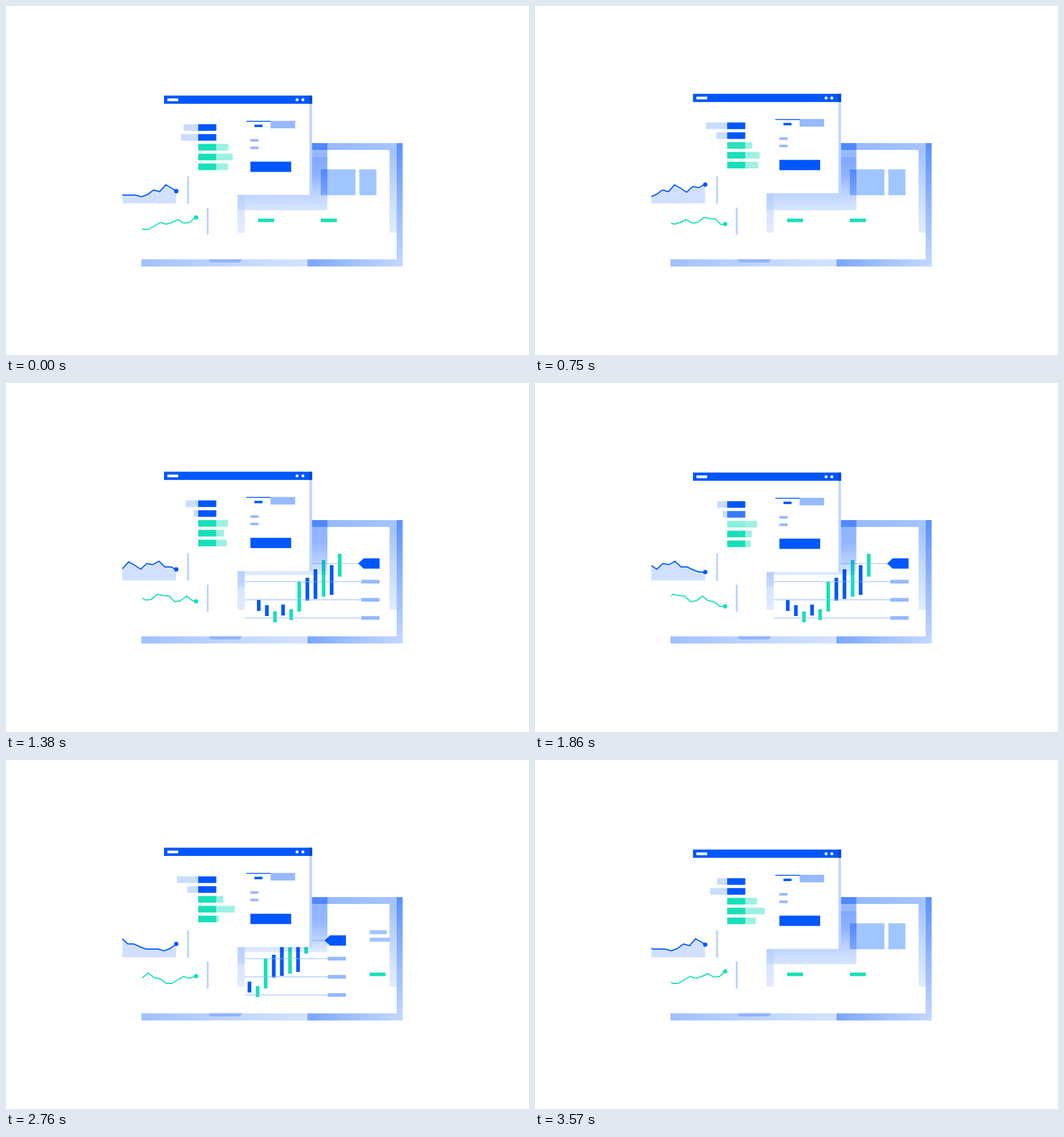
These frames come from a looping animation (917x611 px, 3600 ms). An HTML page with a canvas:

```html
<!DOCTYPE html>
<html lang="en">
<head>
<meta charset="utf-8">
<title>Trading dashboard</title>
<style>
  html, body { margin: 0; width: 100%; height: 100%; overflow: hidden; background: #fff; }
  canvas { display: block; }
</style>
</head>
<body>
<canvas id="stage" width="917" height="611"></canvas>
<script>
const ctx = document.getElementById('stage').getContext('2d');
const LOOP = 3600, STEP = 30, TURN = 2 * Math.PI;
const BLUE = '#0057ff', GREEN = '#17e0b9', PALE = '#96b9ff', SKY = '#a1c6ff';
const SCREEN = { left: 418.5, right: 673, top: 252, bottom: 443.5 };
const PANEL = SCREEN.right - SCREEN.left;

// All boxes are given by their edges.
function box(x0, y0, x1, y1, fill) {
  ctx.fillStyle = fill;
  ctx.fillRect(x0, y0, x1 - x0, y1 - y0);
}

function dot(x, y, r, fill) {
  ctx.fillStyle = fill;
  ctx.beginPath();
  ctx.arc(x, y, r, 0, TURN);
  ctx.fill();
}

function gradient(x0, y0, x1, y1, ...colors) {
  const g = ctx.createLinearGradient(x0, y0, x1, y1);
  colors.forEach((c, i) => g.addColorStop(i / (colors.length - 1), c));
  return g;
}

function clipped(x0, y0, x1, y1, draw) {
  ctx.save();
  ctx.beginPath();
  ctx.rect(x0, y0, x1 - x0, y1 - y0);
  ctx.clip();
  draw();
  ctx.restore();
}

const easeInOut = p => p < 0.5 ? 4 * p ** 3 : 1 - 4 * (1 - p) ** 3;
const ramp = (t, start, length) => easeInOut(Math.min(1, Math.max(0, (t - start) / length)));

// ---- Laptop ----

function laptopFrame() {
  box(537, 240, 685, 252, gradient(563, 0, 685, 0, '#96b9ff', '#a6c5ff'));
  box(536, 240, 563.5, 252, '#5088ff');
  box(685, 240, 695.5, 456, gradient(0, 240, 0, 456, '#5a91ff', '#92b7ff', '#c2d8ff'));
  box(672.5, 252, 685, 397, gradient(0, 252, 0, 397, '#a2c1ff', '#c6daff', '#e2ecff'));
  box(406, 320, 418.5, 397, gradient(0, 320, 0, 397, '#ccddff', '#e2ecff'));
  box(406, 320, 418.5, 357.5, gradient(0, 320, 0, 357, '#b0cbff', '#c6daff'));
  box(237.5, 443.5, 528.5, 456, gradient(237, 0, 528, 0, '#9fbfff', '#bfd5ff', '#d3e3ff'));
  box(528.5, 443.5, 695.5, 456, gradient(528, 0, 695, 0, '#7aa5ff', '#a2c1ff', '#c2d8ff'));
  ctx.fillStyle = '#90b5ff';
  ctx.beginPath();
  ctx.roundRect(356, 443.5, 57, 5.5, [0, 0, 5, 5]);
  ctx.fill();
}

function shadow(top, bottom, ...colors) {
  ctx.globalCompositeOperation = 'multiply';
  box(SCREEN.left, top, 563.5, bottom, gradient(0, top, 0, bottom, ...colors));
  ctx.globalCompositeOperation = 'source-over';
}

function panel(offset, content, drawShadow) {
  const left = Math.max(SCREEN.left, SCREEN.left + offset);
  const right = Math.min(SCREEN.right, SCREEN.right + offset);
  if (right <= left) return;
  clipped(left, SCREEN.top, right, SCREEN.bottom, () => {
    ctx.save();
    ctx.translate(offset, 0);
    content();
    ctx.restore();
    drawShadow();
  });
}

function summary() {
  box(442, 298, 472, 305, SKY);
  box(442, 311, 500, 318, SKY);
  box(552, 286, 612.7, 331.3, SKY);
  box(619.5, 286, 649.5, 331.3, SKY);
  for (const x of [442, 552]) box(x, 372.2, x + 28, 378.4, GREEN);
}

function summaryShadow() {
  shadow(252, 265, '#98baff', '#94b7ff');
  shadow(265, 357.5, '#80a8ff', '#8fb3ff', '#bcd3ff', '#d7e5ff');
}

function candleChart() {
  const tops = [380, 389, 400, 388, 396, 348, 341, 326, 310, 319, 299];
  tops.forEach((top, i) => {
    const x = 440 + i * 14.2;
    const height = i < 5 ? 19 : 52 + 12 * Math.cos(i * TURN / 4);
    const rising = i % 3 === 2 || i % 6 === 4;
    box(x, top, x + 6.4, top + height, rising ? GREEN : BLUE);
  });
  for (let i = 0; i < 4; i++) {
    const y = 316 + i * 31.8;
    box(SCREEN.left, y - 0.5, 623, y + 0.5, '#8fb6f5');
    if (i) box(623, y - 3.3, 655, y + 3.2, PALE);
  }
  ctx.fillStyle = BLUE;
  ctx.beginPath();
  for (const [x, y] of [[617.5, 316], [627, 307], [655, 307], [655, 325], [627, 325]]) ctx.lineTo(x, y);
  ctx.fill();
}

const chartShadow = () => shadow(252, 336.5, '#90b4ff', '#93b6ff', '#b4ceff', '#e2ecff');

function laptopScreen(t) {
  const slide = ramp(t, 772, 486) + ramp(t, 2572, 486);
  panel(-slide * PANEL, summary, summaryShadow);
  panel((1 - slide) * PANEL, candleChart, chartShadow);
  panel((2 - slide) * PANEL, summary, summaryShadow);
}

// ---- Browser window ----

// A row's volume follows a wave, read afresh every BEAT ms from `first` on.
const BEAT = 600;
const orders = [
  { first: 395, waves: 2, peak: 450, mean: 25.5, swing: 12 },
  { first: 575, waves: 1, peak: 3275, mean: 19, swing: 13 },
  { first: 35, waves: 2, peak: 1535, mean: 18, swing: 5.5 },
  { first: 200, waves: 1, peak: 3000, mean: 23, swing: 12 },
  { first: 395, waves: 1, peak: 395, mean: 14, swing: 9 }
];

function orderBook(t) {
  orders.forEach(({ first, waves, peak, mean, swing }, i) => {
    const y = 207 + i * 17.2, sell = i < 2;
    const beat = Math.max(0, first + BEAT * Math.floor((t - first) / BEAT));
    const width = mean + swing * Math.cos(waves * TURN * (beat - peak) / LOOP);
    if (sell) box(337 - width, y, 337, y + 11.6, '#cadcff');
    else box(368.5, y, 368.5 + width, y + 11.6, '#9df1e2');
    // A fresh value starts dimmed and comes back quickly.
    ctx.globalAlpha = beat ? Math.min(1, 0.4 + (t - beat) / 220) : 1;
    box(337, y, 368.7, y + 11.6, sell ? BLUE : GREEN);
    ctx.globalAlpha = 1;
  });
}

function browser(t) {
  ctx.save();
  ctx.translate(0, 1.65 * (Math.cos(t / 1800 * TURN) - 1));
  box(277, 157, 532, 330.8, '#fff');
  box(532, 171, 536.6, 330.8, '#bfd7ff');
  box(277, 156.8, 536.6, 171.2, BLUE);
  box(531.6, 156.8, 536.6, 171.2, '#0747cf');
  box(283, 161.8, 302, 166.6, '#fff');
  for (const x of [510.4, 520.5]) dot(x, 164.1, 2.6, '#fff');

  orderBook(t);

  box(421.3, 201, 464, 202.6, BLUE);
  box(464, 201, 507, 214.2, PALE);
  box(435.6, 207.7, 449.8, 212, BLUE);
  for (const y of [233, 246]) box(428.5, y, 442.8, y + 4.5, PALE);
  box(428.5, 272.5, 500, 290.5, BLUE);
  ctx.restore();
}

// ---- Scrolling line charts ----

// Heights are evenly spaced over one span, which repeats.
const blueLine = {
  left: 204, right: 298.5, start: 227, span: 169.9, color: BLUE, base: 345.5,
  heights: [331, 334, 330, 322, 325, 313, 319, 326, 316, 318, 312, 322, 322, 327, 331, 331]
};
const greenLine = {
  left: 238.5, right: 333.3, start: 250, span: 174.7, color: GREEN,
  heights: [391, 385, 379, 382, 379, 374, 380, 379, 370, 372, 373, 383, 381, 373, 381, 383, 391]
};

function scrollingLine({ left, right, start, span, color, base, heights }, t) {
  const count = heights.length, gap = span / count;
  const origin = start - span * (1 + t / LOOP);
  const position = (right - origin) / gap, last = Math.floor(position);
  const height = i => heights[i % count];
  const endY = height(last) + (height(last + 1) - height(last)) * (position - last);

  const trace = () => {
    ctx.beginPath();
    for (let i = 0; i <= last; i++) ctx.lineTo(origin + i * gap, height(i));
    ctx.lineTo(right, endY);
  };
  clipped(left, 290, right, 400, () => {
    if (base) {
      trace();
      ctx.lineTo(right, base);
      ctx.lineTo(origin, base);
      ctx.fillStyle = '#d1e0ff';
      ctx.fill();
    }
    trace();
    ctx.strokeStyle = color;
    ctx.lineWidth = 2;
    ctx.stroke();
  });
  dot(right, endY, 3.8, color);
}

function draw(t) {
  ctx.clearRect(0, 0, 917, 611);
  laptopFrame();
  laptopScreen(t);
  browser(t);
  box(317.5, 298.3, 321, 346, '#b9d4ff');
  box(352, 353, 355.4, 400.2, '#b9d4ff');
  scrollingLine(blueLine, t);
  scrollingLine(greenLine, t);
}

// Time advances in whole steps; the small lead absorbs timer jitter.
const begin = performance.now();
function tick() {
  const elapsed = performance.now() - begin + 4;
  draw(Math.floor(elapsed / STEP) * STEP % LOOP);
  requestAnimationFrame(tick);
}
tick();
</script>
</body>
</html>
```
